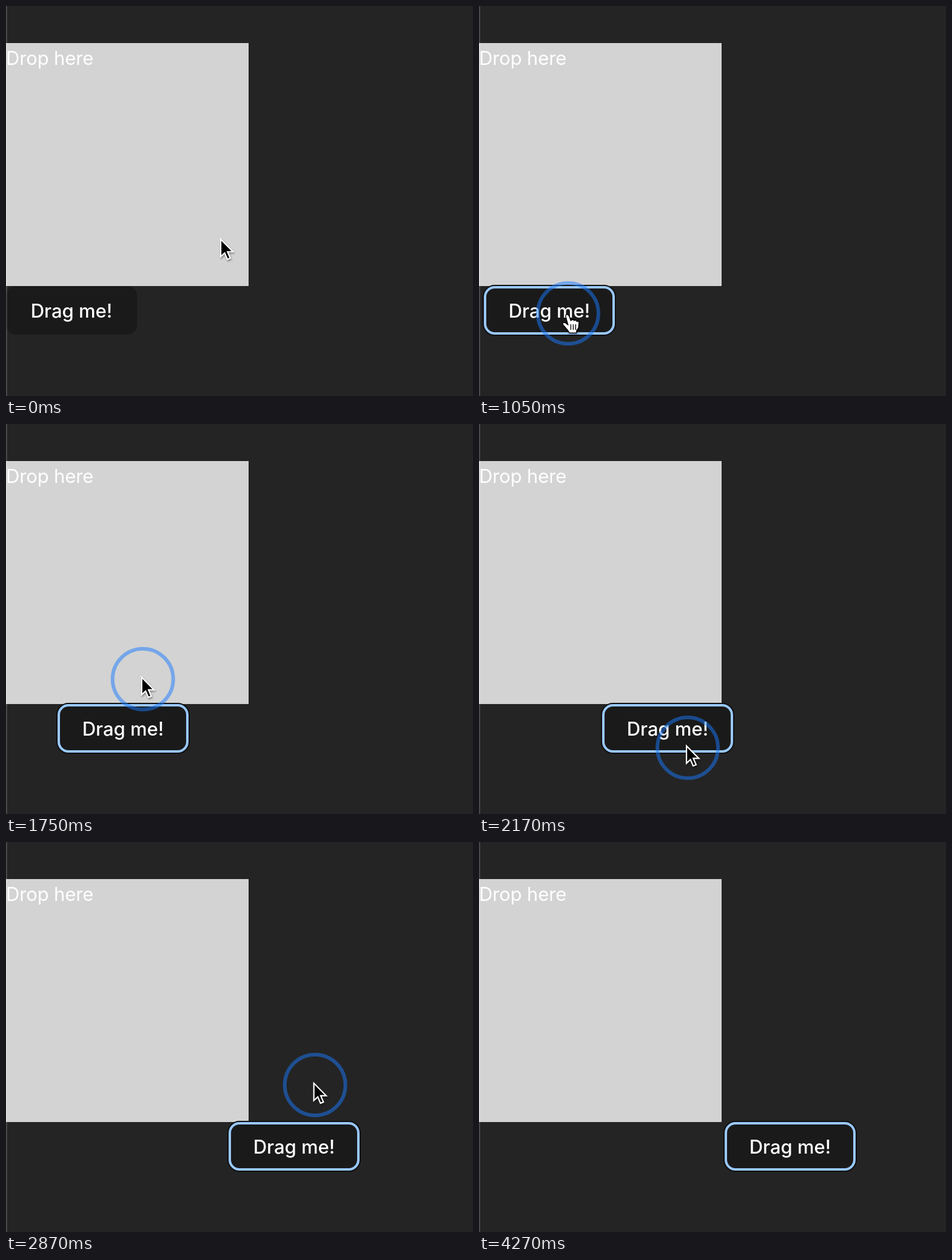
Animation, 770 px wide and 642 px high, one loop 4410 ms. Source, as an HTML page:

```html
<!DOCTYPE html>
<html lang="en">
<head>
<meta charset="utf-8">
<title>Drag along one axis</title>
<style>
  html, body { margin: 0; width: 100%; height: 100%; overflow: hidden; background: #242424; }
  svg { display: block; width: 770px; height: 642px; }
  text { font-family: Inter, "Open Sans", sans-serif; font-size: 31px; letter-spacing: -0.15px; fill: #fff; }
  #label { font-weight: 500; letter-spacing: 0; text-anchor: middle; }
  #cursor { filter: drop-shadow(1px 2px 1.5px rgba(0, 0, 0, .4)); }
</style>
</head>
<body>
<svg viewBox="0 0 770 642">
  <rect width="770" height="642" fill="#242424"/>
  <rect y="61" width="400" height="400" fill="#d3d3d3"/>
  <text x="0" y="97">Drop here</text>

  <g id="button">
    <rect y="461" width="216" height="80" rx="16" fill="#1a1a1a"/>
    <g id="focus" fill="none">
      <rect x="-1" y="460" width="218" height="82" rx="19" stroke="#101010" stroke-width="2"/>
      <rect x="2" y="463" width="212" height="76" rx="16" stroke="#99c8ff" stroke-width="4"/>
    </g>
    <text id="label" x="108" y="513">Drag me!</text>
  </g>
  <rect width="2" height="642" fill="#fff" opacity=".17"/>

  <g id="pointer">
    <circle id="ring" r="50" fill="none" stroke="#187aff" stroke-width="6" opacity=".5"/>
    <g id="cursor">
      <path id="arrow" d="M-2-3V25.500L4.500 19.500L9 30L13.800 28L9.300 17.500H18.300Z"
            fill="#000" stroke="#fff" stroke-width="2.200"/>
      <g id="hand" stroke="#000" stroke-width="1.300" stroke-linejoin="round">
        <path fill="#fff" d="M-4 5C-5 1 0 1 1.500 4L4.500 12C6 9.500 9 9.500 10 12C11 10.500 14 11 14.500 13.500
          C16 12 18 13 18 15.500L17 24L14 28V32H2L-1 27L-8 19C-11 15-6 14-4 16L0 19Z"/>
        <path d="M4.500 18V27M8.500 18V27M12.500 18V27"/>
      </g>
    </g>
  </g>
</svg>
<script>
const LOOP = 4410, STEP = 70;
const PRESS = 700, RELEASE = 3640, FADE = 4200, GONE = 4270;
const GRAB = 138.5, LAG = 12;
const $ = id => document.getElementById(id);

// Turning points of the pointer: time, x, y.
const path = [
  [0, 356, 387], [600, 139, 506], [1038, 146.5, 506], [1400, 182, 549], [1738, 223.5, 419],
  [2010, 304, 607], [2158, 341.5, 539], [2430, 394, 400], [2858, 505.5, 400],
  [2960, 540, 405], [3418, 543.5, 493]
];

// Smooth curve through one coordinate of the path, without overshoot.
function along(axis, t) {
  const end = path.length - 1;
  const slope = i => (path[i + 1][axis] - path[i][axis]) / (path[i + 1][0] - path[i][0]);
  const tangent = i => {
    if (i === 0 || i === end) return 0;
    const a = slope(i - 1), b = slope(i);
    return a * b > 0 ? 2 * a * b / (a + b) : 0;
  };
  if (t <= 0) return path[0][axis];
  if (t >= path[end][0]) return path[end][axis];
  const i = path.findIndex(p => p[0] >= t) - 1;
  const p = path[i], q = path[i + 1];
  const span = q[0] - p[0], u = (t - p[0]) / span, w = 1 - u;
  return p[axis] * (1 + 2 * u) * w * w + q[axis] * u * u * (3 - 2 * u)
    + span * u * w * (tangent(i) * w - tangent(i + 1) * u);
}

const pointerX = t => along(1, t);
const pointerY = t => along(2, t);
// The button follows the pointer sideways only.
const buttonX = t => t < PRESS ? 0 : Math.max(0, pointerX(t - LAG) - GRAB);

function overButton(t) {
  const x = pointerX(t) - buttonX(t), y = pointerY(t);
  return x > 0 && x < 216 && y > 461 && y < 541;
}

function show(id, visible) {
  $(id).setAttribute("visibility", visible ? "visible" : "hidden");
}

function move(id, x, y) {
  $(id).setAttribute("transform", `translate(${x.toFixed(1)} ${y.toFixed(1)})`);
}

function draw(t) {
  move("button", Math.round(buttonX(t)), 0);
  move("pointer", pointerX(t), pointerY(t));
  // The cursor shape reacts slightly late to what lies beneath it.
  const hovering = overButton(t - 100);
  show("hand", hovering);
  show("arrow", !hovering);
  show("focus", t >= PRESS);
  show("ring", t >= PRESS && t < RELEASE);
  $("pointer").setAttribute("opacity", t >= GONE ? 0 : t >= FADE ? 0.5 : 1);
}

const start = performance.now();
function tick() {
  const t = (performance.now() - start) % LOOP;
  draw(Math.min(Math.floor(t / STEP) * STEP, GONE));
  requestAnimationFrame(tick);
}
tick();
</script>
</body>
</html>
```
